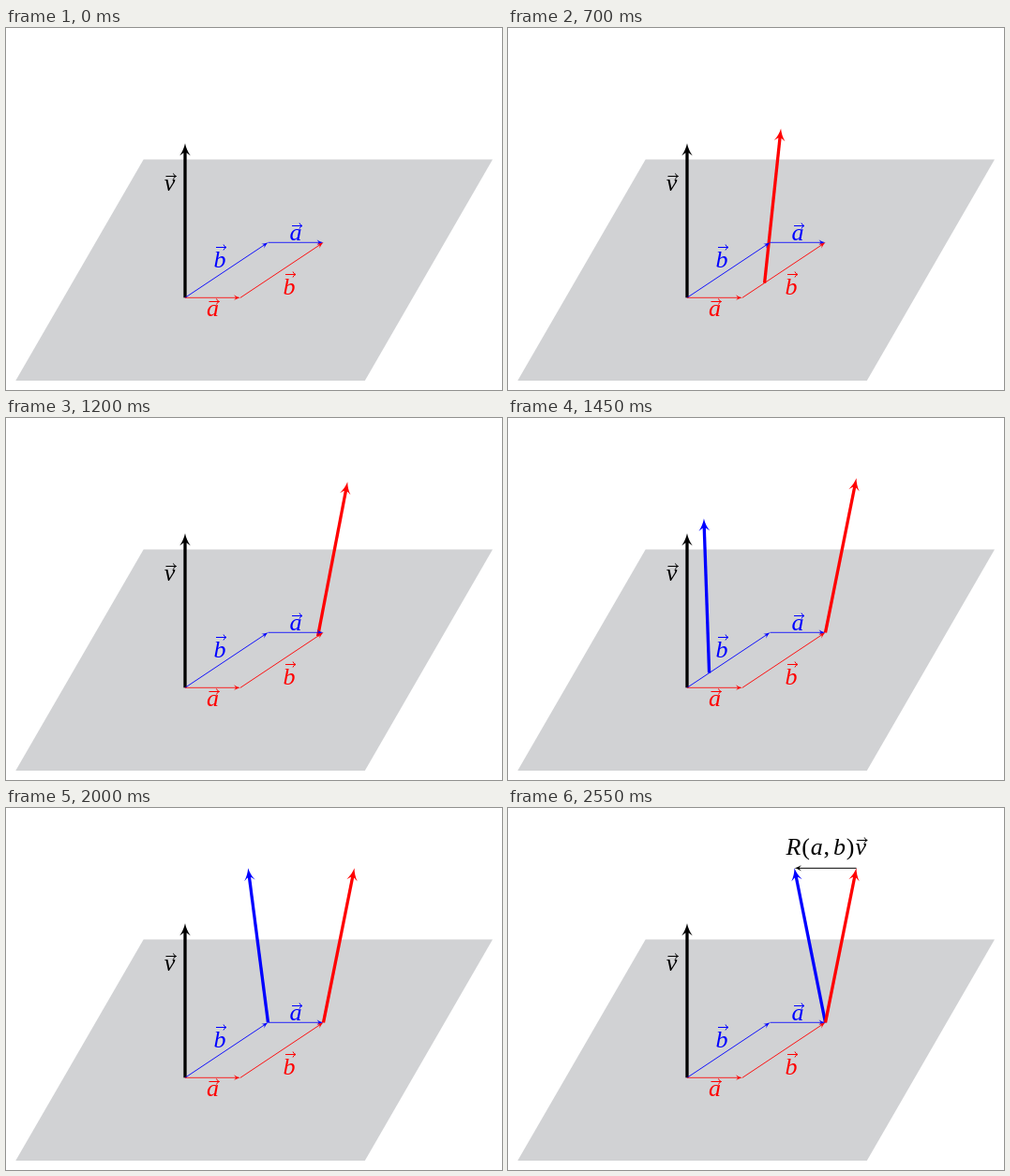
Write an HTML page with a canvas that moves like this. It is 529 px wide and 387 px high and loops after 3300 ms.

```html
<!DOCTYPE html>
<html lang="en">
<head>
<meta charset="utf-8">
<title>Parallel transport around a parallelogram</title>
<style>
html, body { margin: 0; width: 100%; height: 100%; overflow: hidden; background: #fff; }
canvas { display: block; }
</style>
</head>
<body>
<canvas id="stage" width="529" height="387"></canvas>
<script>
const ctx = document.getElementById('stage').getContext('2d');
const RED = '#f00', BLUE = '#00f', BLACK = '#000', GREY = '#d1d2d4';
const LOOP = 3300, STEP = 50, LAST_STEP = 51;
const THIN = 0.83, THICK = 3.32;
const FONT = '"Liberation Serif", serif';
const SIZE = 26;

const origin = [191, 288.3];
const a = [59, 0];
const b = [88.5, -59];
const v = [0, -165];
const TILT = 0.2;

const add = (p, q, k = 1) => [p[0] + q[0] * k, p[1] + q[1] * k];
const cornerA = add(origin, a);
const cornerB = add(origin, b);
const corner = add(cornerA, b);

function arrow(from, to, color, width) {
  const dx = to[0] - from[0], dy = to[1] - from[1];
  const length = Math.hypot(dx, dy);
  const u = 0.58 + 0.3 * width;
  ctx.save();
  ctx.translate(...to);
  ctx.rotate(Math.atan2(dy, dx));
  ctx.strokeStyle = ctx.fillStyle = color;
  ctx.lineWidth = width;
  ctx.beginPath();
  ctx.moveTo(-length, 0);
  ctx.lineTo(-5 * u, 0);
  ctx.stroke();
  ctx.beginPath();
  ctx.moveTo(0, 0);
  for (const side of [1, -1]) {
    const back = [-8.4 * u, 3.7 * side * u];
    if (side > 0) {
      ctx.bezierCurveTo(-3 * u, 0.6 * u, -6 * u, 1.9 * u, ...back);
      ctx.quadraticCurveTo(-6.6 * u, 1.6 * u, -5.8 * u, 0);
    } else {
      ctx.quadraticCurveTo(-6.6 * u, -1.6 * u, ...back);
      ctx.bezierCurveTo(-6 * u, -1.9 * u, -3 * u, -0.6 * u, 0, 0);
    }
  }
  ctx.fill();
  ctx.restore();
}

function vecMark(x, y) {
  ctx.lineWidth = 1;
  ctx.beginPath();
  ctx.moveTo(x - 4, y);
  ctx.lineTo(x + 7, y);
  ctx.moveTo(x + 4, y - 3);
  ctx.quadraticCurveTo(x + 4.6, y - 0.7, x + 7, y);
  ctx.quadraticCurveTo(x + 4.6, y + 0.7, x + 4, y + 3);
  ctx.stroke();
}

function vectorLabel(letter, x, baseline, color) {
  ctx.fillStyle = ctx.strokeStyle = color;
  ctx.font = `italic ${SIZE}px ${FONT}`;
  ctx.textAlign = 'center';
  ctx.fillText(letter, x, baseline);
  vecMark(x, baseline - (letter === 'b' ? 21 : 15.5));
}

function resultLabel(x, baseline) {
  ctx.fillStyle = BLACK;
  ctx.textAlign = 'left';
  for (const part of ['R', '(', 'a', ',', 'b', ')']) {
    const style = /[a-z]/i.test(part) ? 'italic ' : '';
    ctx.font = `${style}${SIZE}px ${FONT}`;
    ctx.fillText(part, x, baseline);
    x += ctx.measureText(part).width + (part === ',' ? 4 : 0.8);
  }
  vectorLabel('v', x + 6, baseline, BLACK);
}

// Moves v along two edges; it leans in proportion to the distance covered.
function transported(step, first, firstSteps, second, secondSteps, lean) {
  const p = Math.min(step / firstSteps, 1);
  const q = Math.min(Math.max(step - firstSteps, 0) / secondSteps, 1);
  const base = add(add(origin, first, p), second, q);
  const distance = p * Math.hypot(...first) + q * Math.hypot(...second);
  return [base, add(add(base, v), [lean * TILT * distance, 0])];
}

function drawPlane() {
  ctx.fillStyle = GREY;
  ctx.beginPath();
  ctx.moveTo(146.7, 140.5);
  ctx.lineTo(519, 140.5);
  ctx.lineTo(382.8, 377);
  ctx.lineTo(10.3, 377);
  ctx.fill();
}

function drawEdges() {
  arrow(origin, cornerB, BLUE, THIN);
  arrow(cornerB, corner, BLUE, THIN);
  arrow(origin, cornerA, RED, THIN);
  arrow(cornerA, corner, RED, THIN);
  vectorLabel('b', 228, 255.5, BLUE);
  vectorLabel('a', 309, 227, BLUE);
  vectorLabel('a', 220.5, 308, RED);
  vectorLabel('b', 302, 284.5, RED);
  vectorLabel('v', 174.5, 174, BLACK);
}

function draw(time) {
  const step = Math.min(Math.floor(time % LOOP / STEP), LAST_STEP);
  const red = transported(step, a, 10, b, 15, 1);
  const blue = transported(step - 25, b, 15, a, 10, -1);
  ctx.fillStyle = '#fff';
  ctx.fillRect(0, 0, 529, 387);
  drawPlane();
  arrow(origin, add(origin, v), BLACK, THICK);
  if (step > 25) arrow(...blue, BLUE, THICK);
  if (step > 0) arrow(...red, RED, THICK);
  drawEdges();
  if (step === LAST_STEP) {
    arrow(red[1], blue[1], BLACK, 1);
    resultLabel(296.5, 50);
  }
}

const start = performance.now();
function tick() {
  draw(performance.now() - start);
  requestAnimationFrame(tick);
}
tick();
</script>
</body>
</html>
```
